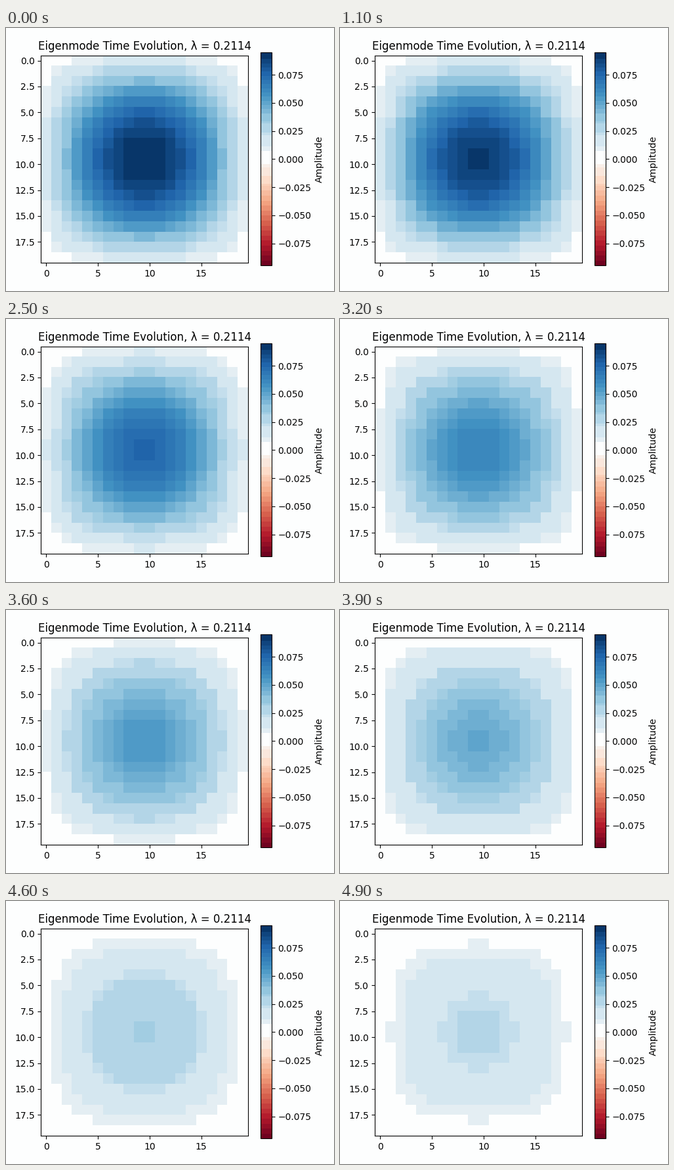
A matplotlib script for the animation above (5 s loop, 500 by 400 pixels).

```python
import numpy as np
import matplotlib.pyplot as plt
from matplotlib.animation import FuncAnimation
from matplotlib.colors import ListedColormap, to_rgba

N = 20
FRAMES, INTERVAL = 50, 100
PAPER = "#fdfefe"

# Lowest mode of a square membrane with fixed edges
profile = np.sin(np.pi * np.arange(1, N + 1) / (N + 1))
mode = 2 / (N + 1) * np.outer(profile, profile)
omega = np.sqrt(4 - 4 * np.cos(np.pi / (N + 1)))
times = np.linspace(0, 2 * np.pi, FRAMES, endpoint=False)
vmax = mode.max()


def banded_map():
    """RdBu in flat bands: a white middle, then nearly even steps outwards."""
    reds = -np.r_[128:30:-6, 30, 20, 10, 6]
    blues = np.r_[10, 15, 29, 32, 43, 45, 55:121:5, 128]
    edges = 128 + np.r_[reds, blues]
    base = plt.get_cmap("RdBu")
    table = np.empty((256, 4))
    for lo, hi in zip(edges, edges[1:]):
        table[lo:hi] = to_rgba(PAPER) if lo < 128 < hi else base((lo + hi) // 2)
    return ListedColormap(table)


fig, ax = plt.subplots(figsize=(5, 4), dpi=100, facecolor=PAPER)
image = ax.imshow(mode, cmap=banded_map(), vmin=-vmax, vmax=vmax,
                  interpolation="nearest")
ax.set_xticks(np.arange(0, N, 5))
ax.set_yticks(np.arange(0, N, 2.5))
ax.set_title(f"Eigenmode Time Evolution, λ = {omega:.4f}")
fig.colorbar(image, ax=ax, label="Amplitude",
             ticks=np.arange(-3, 4) * 0.025)
fig.tight_layout()


def draw(i):
    image.set_data(mode * np.cos(omega * times[i]))
    return [image]


anim = FuncAnimation(fig, draw, frames=FRAMES, interval=INTERVAL,
                     repeat=True, repeat_delay=0)
plt.show()
```
